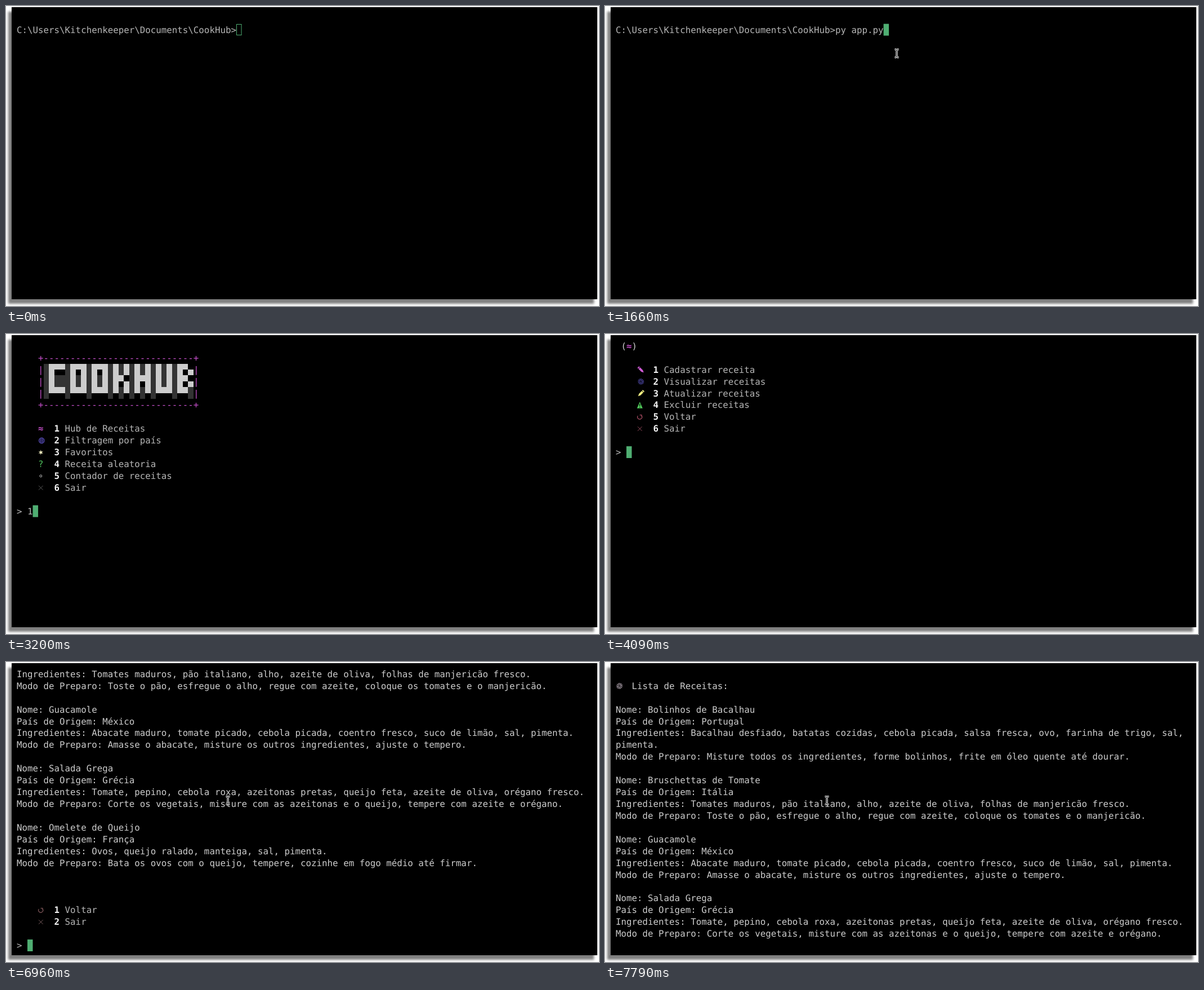
Animation of 1053x532 px, one loop 8000 ms. Source, as an HTML page:

```html
<!DOCTYPE html>
<html lang="pt">
<head>
<meta charset="utf-8">
<title>CookHub</title>
<style>
  html, body { margin: 0; width: 100%; height: 100%; overflow: hidden; background: #fff; }
  #window {
    position: absolute; left: 9.5px; top: 1.5px; width: 1040.5px; height: 518.5px;
    background: #000; box-shadow: -6px 8px 4px rgba(0, 0, 0, .5);
  }
  svg { position: absolute; left: 0; top: 0; }
  text {
    font: 15.8px "DejaVu Sans Mono", monospace; white-space: pre; fill: #b6b6b6;
    text-rendering: geometricPrecision; font-variant-ligatures: none;
  }
  text.body { fill: #cdcdcd; }
  text.num { fill: #f4f4f4; font-weight: bold; }
  text.pink { fill: #c44fc9; }
  text.wave { fill: #c44fc9; font-weight: bold; }
  text.green { fill: #4fc05c; }
  .hidden { display: none; }
</style>
</head>
<body>
<div id="window"></div>
<svg width="1053" height="532" viewBox="0 0 1053 532">
  <clipPath id="rows"><rect x="10" y="10.7" width="1039" height="502.4"/></clipPath>
  <g clip-path="url(#rows)">
    <g id="screen">
      <g id="home"></g>
      <g id="hub"></g>
      <g id="list"></g>
      <text id="input"></text>
      <rect id="caret"/>
    </g>
  </g>
  <g id="mouse" fill="none" stroke-linejoin="round">
    <path id="beam" d="M-3.4-7h1.9L0-5.4 1.5-7h1.9M0-5.4V5.4M-3.4 7h1.9L0 5.4 1.5 7h1.9" stroke="#ddd" stroke-width="3"/>
    <use href="#beam"/>
    <path d="M-3.4-7h1.9L0-5.4 1.5-7h1.9M0-5.4V5.4M-3.4 7h1.9L0 5.4 1.5 7h1.9" stroke="#000" stroke-width="1"/>
  </g>
</svg>
<script>
const LOOP = 8000, X0 = 19, Y0 = 10.7, CW = 9.512, RH = 20.93;
const $ = id => document.getElementById(id);
const colX = c => X0 + c * CW;
const rowY = r => Y0 + r * RH;
const baseline = r => rowY(r) + 16.1;

const label = (row, col, str, cls = '') =>
  `<text class="${cls}" x="${colX(col)}" y="${baseline(row)}">${str}</text>`;

const line = (d, color, width = 1) =>
  `<path d="${d}" fill="none" stroke="${color}" stroke-width="${width}"/>`;

const pencil = (color, angle) =>
  `<path transform="translate(2 0) rotate(${angle})" fill="${color}"
    d="M-6.8-2h2v4h-2zM-4-2h7l4 2-4 2h-7z"/>`;

const icons = {
  globe: c => `<g transform="translate(1.5 0)"><circle r="5" fill="none" stroke="${c}"/>` +
    line('M-2.8-4V4M-1-5V5M1-5V5M2.8-4V4', c) + '</g>',
  star: c => {
    let d = '';
    for (let i = 0; i < 12; i++) {
      const a = i * Math.PI / 6, r = i % 2 ? 1.8 : 4.6;
      d += (i ? 'L' : 'M') + (r * Math.sin(a)).toFixed(2) + ' ' + (-r * Math.cos(a)).toFixed(2);
    }
    return `<path d="${d}z" fill="${c}"/>`;
  },
  ring: c => `<circle r="1.9" fill="none" stroke="${c}"/>`,
  cross: c => line('M-3.8-3.8L3.8 3.8M3.8-3.8L-3.8 3.8', c),
  loop: c => line('M-3.5-2.2A4 4 0 1 0 3-2.6M-.2-3.6h3.4v3.2', c, 1.2),
  burst: c => `<circle cx="2" r="3.2" fill="none" stroke="${c}" stroke-width="4.4"
    pathLength="24" stroke-dasharray="1 1"/>`,
  pen: c => pencil(c, 45),
  edit: c => pencil(c, 135),
  warn: c => `<path d="M0-6L5 5.5H-5z" fill="${c}"/>` + line('M0-2.5V1.8M0 3V4.4', '#000', 1.3)
};

const icon = (row, col, name, color) =>
  `<g transform="translate(${colX(col + .5)} ${rowY(row + .5) + .4})">${icons[name](color)}</g>`;

// Each entry: icon name (or text glyph), its colour (or class), caption.
const menu = (top, entries) => entries.map(([mark, tint, str], i) =>
  (icons[mark] ? icon(top + i, 4, mark, tint) : label(top + i, 4, mark, tint)) +
  label(top + i, 7, i + 1, 'num') + label(top + i, 9, str)).join('');

const banner = (top, left, art) => {
  const box = (c, y, h, color) => `<rect x="${colX(c)}" y="${y}" width="${CW}" height="${h}"
    fill="${color}" shape-rendering="crispEdges"/>`;
  return art.map((str, r) => [...str].map((ch, c) => {
    const y = rowY(top + r), half = RH / 2;
    if (ch === '░') return box(left + c, y, RH, '#333');
    return box(left + c, ch === '▄' ? y + half : y, ch === '█' ? RH : half, '#ccc');
  }).join('')).join('');
};

const edge = '+' + '-'.repeat(28) + '+';
$('home').innerHTML =
  label(1, 4, edge, 'pink') + label(5, 4, edge, 'pink') +
  [2, 3, 4].map(r => label(r, 4, '|', 'pink') + label(r, 33, '|', 'pink')).join('') +
  banner(2, 5, [
    '░█▀▀░█▀█░█▀█░█░█░█░█░█░█░█▀▄',
    '░█░░░█░█░█░█░█▀▄░█▀█░█░█░█▀▄',
    '░▀▀▀░▀▀▀░▀▀▀░▀░▀░▀░▀░▀▀▀░▀▀░'
  ]) +
  menu(7, [
    ['≈', 'wave', 'Hub de Receitas'],
    ['globe', '#5d52c4', 'Filtragem por país'],
    ['star', '#f3efc0', 'Favoritos'],
    ['?', 'green', 'Receita aleatoria'],
    ['ring', '#c8c8c8', 'Contador de receitas'],
    ['cross', '#585858', 'Sair']
  ]);

$('hub').innerHTML =
  label(0, 1, '(', 'body') + label(0, 2, '≈', 'wave') + label(0, 3, ')', 'body') +
  menu(2, [
    ['pen', '#d05cd6', 'Cadastrar receita'],
    ['burst', '#5650b8', 'Visualizar receitas'],
    ['edit', '#f2ee80', 'Atualizar receitas'],
    ['warn', '#52cc5c', 'Excluir receitas'],
    ['loop', '#a84c62', 'Voltar'],
    ['cross', '#92485a', 'Sair']
  ]);

const recipes = `Nome: Bolinhos de Bacalhau
País de Origem: Portugal
Ingredientes: Bacalhau desfiado, batatas cozidas, cebola picada, salsa fresca, ovo, farinha de trigo, sal,
pimenta.
Modo de Preparo: Misture todos os ingredientes, forme bolinhos, frite em óleo quente até dourar.

Nome: Bruschettas de Tomate
País de Origem: Itália
Ingredientes: Tomates maduros, pão italiano, alho, azeite de oliva, folhas de manjericão fresco.
Modo de Preparo: Toste o pão, esfregue o alho, regue com azeite, coloque os tomates e o manjericão.

Nome: Guacamole
País de Origem: México
Ingredientes: Abacate maduro, tomate picado, cebola picada, coentro fresco, suco de limão, sal, pimenta.
Modo de Preparo: Amasse o abacate, misture os outros ingredientes, ajuste o tempero.

Nome: Salada Grega
País de Origem: Grécia
Ingredientes: Tomate, pepino, cebola roxa, azeitonas pretas, queijo feta, azeite de oliva, orégano fresco.
Modo de Preparo: Corte os vegetais, misture com as azeitonas e o queijo, tempere com azeite e orégano.

Nome: Omelete de Queijo
País de Origem: França
Ingredientes: Ovos, queijo ralado, manteiga, sal, pimenta.
Modo de Preparo: Bata os ovos com o queijo, tempere, cozinhe em fogo médio até firmar.`;

$('list').innerHTML =
  icon(1, 0, 'burst', '#c4b6c2') + label(1, 3, 'Lista de Receitas:', 'body') +
  recipes.split('\n').map((str, i) => label(3 + i, 0, str, 'body')).join('') +
  menu(31, [['loop', '#80575a', 'Voltar'], ['cross', '#74585a', 'Sair']]);

// Time, screen, input row, input text, rows scrolled away.
const prompt = 'C:\\Users\\Kitchenkeeper\\Documents\\CookHub>';
const FOCUS = 1660;
const states = [
  [0, '', 1, prompt, 0],
  [FOCUS, '', 1, prompt + 'py app.py', 0],
  [2150, 'home', 13, '', 0],
  [2180, 'home', 14, '> ', 0],
  [3200, 'home', 14, '> 1', 0],
  [4060, 'hub', 8, '', 0],
  [4090, 'hub', 9, '> ', 0],
  [5080, 'hub', 9, '> 2', 0],
  [5810, 'list', 33, '', 10],
  [5840, 'list', 34, '> ', 11],
  [7160, 'list', 34, '> ', 8],
  [7290, 'list', 34, '> ', 5],
  [7460, 'list', 34, '> ', 2],
  [7790, 'list', 34, '> ', 0]
];

// Pointer visits: when it hides, then points of time, x, y.
const visits = [
  { end: 1690, path: [[200, 627, 513.5], [320, 556, 350], [440, 468, 165], [560, 414, 66], [650, 405, 40.5],
    [780, 411.5, 51.5], [980, 413, 48.5], [1010, 413, 48.5], [1130, 466, 64], [1220, 506, 80], [1280, 518, 84]] },
  { end: 4060, path: [[3630, 518, 84.5], [3660, 517.5, 84.5]] },
  { end: LOOP, path: [[6530, 506, 100.5], [6620, 470, 150], [6740, 425, 206], [6850, 402, 236], [6950, 394, 245.5]] }
];

function pointerAt(t) {
  const visit = visits.find(v => t >= v.path[0][0] && t < v.end);
  if (!visit) return null;
  const { path } = visit, start = path[0][0];
  const q = start + Math.floor((t - start) / 30) * 30;
  const i = path.findIndex(p => p[0] > q);
  if (i < 0) return path[path.length - 1].slice(1);
  const [ta, xa, ya] = path[i - 1], [tb, xb, yb] = path[i];
  const k = (q - ta) / (tb - ta);
  return [xa + (xb - xa) * k, ya + (yb - ya) * k];
}

const set = (el, attrs) => { for (const k in attrs) el.setAttribute(k, attrs[k]); };
let shown = null;

function show(state) {
  const [time, name, row, str, scroll] = state;
  for (const id of ['home', 'hub', 'list']) $(id).classList.toggle('hidden', id !== name);
  set($('screen'), { transform: `translate(0 ${-scroll * RH})` });
  $('input').textContent = str;
  set($('input'), { x: X0, y: baseline(row) });
  const x = colX(str.length), y = rowY(row);
  set($('caret'), time >= FOCUS
    ? { x, y, width: CW, height: RH, fill: '#4fae72', stroke: 'none' }
    : { x: 409.5, y: 32.5, width: 8.5, height: 19, fill: 'none', stroke: '#4fae72' });
}

function draw(t) {
  const state = states.filter(s => s[0] <= t).pop();
  if (state !== shown) show(shown = state);
  const at = pointerAt(t);
  $('mouse').classList.toggle('hidden', !at);
  if (at) set($('mouse'), { transform: `translate(${at[0]} ${at[1]})` });
}

const began = performance.now();
function tick() {
  draw((performance.now() - began) % LOOP);
  requestAnimationFrame(tick);
}
tick();
</script>
</body>
</html>
```
